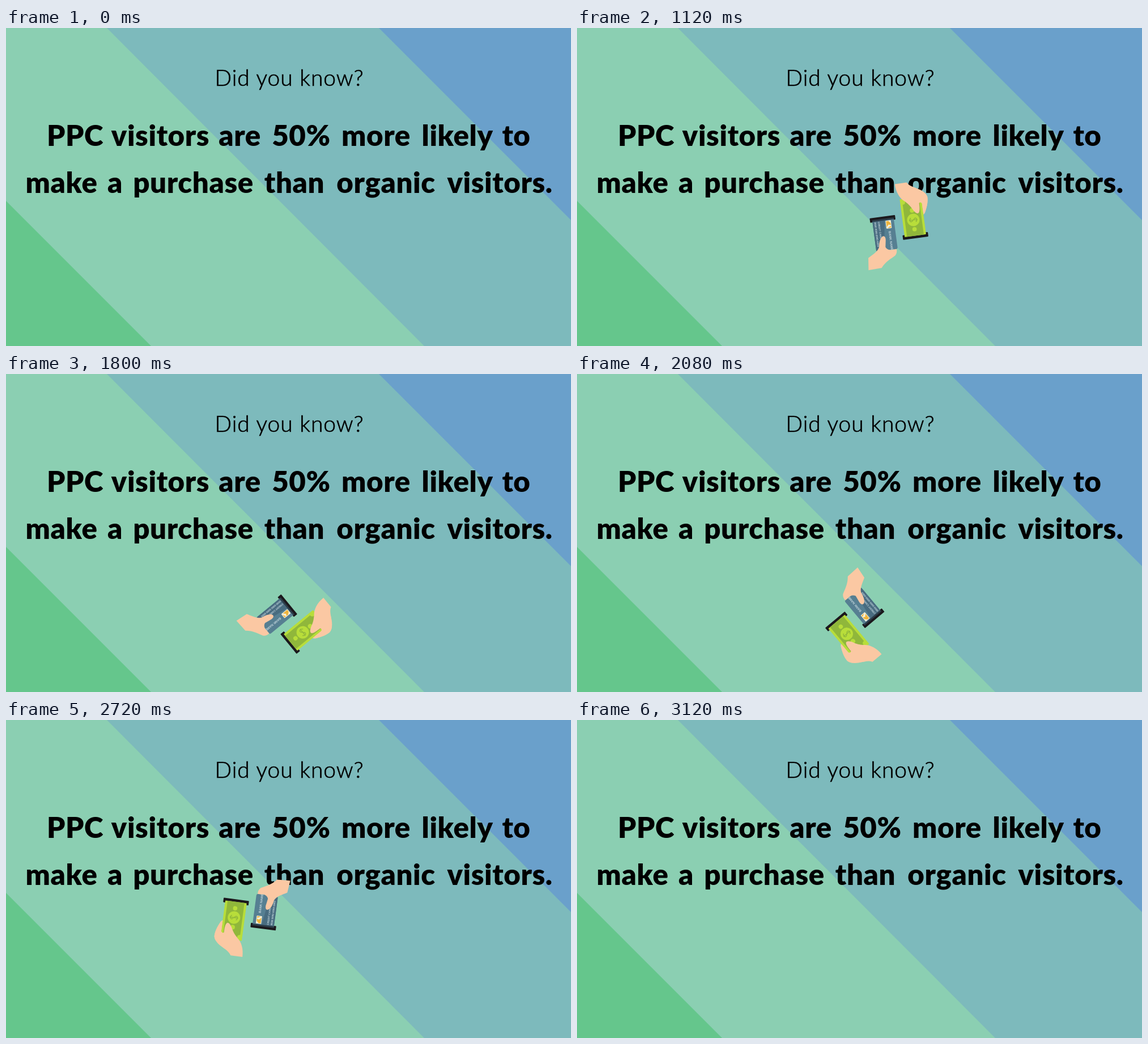
Write an HTML page that moves like this. It is 997 px wide and 561 px high and loops after 3880 ms.

```html
<!DOCTYPE html>
<html lang="en">
<head>
<meta charset="utf-8">
<title>Did you know?</title>
<style>
  html, body { margin: 0; width: 100%; height: 100%; overflow: hidden; }
  svg { display: block; width: 100%; height: 100%; }
  .intro, .fact { text-anchor: middle; }
  .intro { font: 300 39px Lato, "Open Sans", sans-serif; letter-spacing: 1px; stroke: #000; stroke-width: .7px; }
  .fact { font: 900 51px Lato, "Noto Sans", sans-serif; letter-spacing: .6px; }
  .print { font: 700 4.5px "Liberation Sans", sans-serif; fill: #c3d6dc; }
  .print .bank { font-size: 5.6px; }
  .skin { fill: #fbc8a3; }
  .slot { fill: #1b181c; }
</style>
</head>
<body>
<svg viewBox="0 0 997 561">
  <rect width="997" height="561" fill="#8bcfb2"/>
  <path d="M178 0H997V561H738Z" fill="#7dbabc"/>
  <path d="M658 0H997V339Z" fill="#6aa0cb"/>
  <path d="M0 305L256 561H0Z" fill="#65c68c"/>

  <text class="intro" x="500" y="102">Did you know?</text>
  <text class="fact" y="208"><tspan x="122">PPC</tspan><tspan x="272.5">visitors</tspan><tspan x="412.5">are</tspan><tspan x="521">50%</tspan><tspan x="653">more</tspan><tspan x="796.5">likely</tspan><tspan x="900.5">to</tspan></text>
  <text class="fact" y="290.500"><tspan x="98">make</tspan><tspan x="192.5">a</tspan><tspan x="330.5">purchase</tspan><tspan x="509">than</tspan><tspan x="670.5">organic</tspan><tspan x="871.5">visitors.</tspan></text>

  <g id="icon" visibility="hidden">
    <!-- card -->
    <rect class="slot" x="456" y="415" width="45" height="8" rx="1"/>
    <path d="M460 420H498V472Q498 475 495 475H463Q460 475 460 472Z" fill="#567f92"/>
    <path d="M460 420H482L474 475H463Q460 475 460 472Z" fill="#496c80"/>
    <rect x="460" y="419" width="38" height="3" fill="#2c3c48"/>
    <rect x="483" y="423" width="9.5" height="14" rx="1" fill="#f4efd9"/>
    <path d="M484 424H488L491.5 428V432L488 430L484 434ZM485 436L491.5 433V436Z" fill="#eeb43c"/>
    <g class="print">
      <text class="bank" transform="translate(486 442) rotate(90)">BANK NAME</text>
      <text transform="translate(469.5 423) rotate(90)">CREDIT CARD</text>
      <text transform="translate(463 423) rotate(90)">0000 0000 0000 0000</text>
    </g>
    <path class="skin" d="M475 449.500C479 449 480 454 478.500 460L477 469C479 474 484 476 489 475L496 475Q496.500 482 492 486C483 491 474 494 465.500 504.500L442 505.500L444.500 484C453 479 463 475 466 467C467 459 470 451 475 449.500Z"/>

    <!-- cash -->
    <path class="skin" d="M540 371C551 376 560 382 562 391C562 402 557 412 554 418Q551 423 547 420V388Z"/>
    <rect class="slot" x="509.5" y="452.5" width="45" height="8" rx="1"/>
    <rect x="513" y="389" width="38" height="67" rx="1" fill="#b8dd3a"/>
    <path d="M522 394H542Q542 399 547 399V456H517V399Q522 399 522 394Z" fill="#90b73b"/>
    <g fill="#b8dd3a">
      <circle cx="532" cy="428" r="11"/>
      <circle cx="532" cy="411" r="4"/>
      <circle cx="532" cy="444.5" r="3.8"/>
    </g>
    <path d="M528 424C524 427 526 433 530 430L534 426C538 423 540 429 536 432M524.5 428H539.5" fill="none" stroke="#90b73b" stroke-width="1.4"/>
    <path class="skin" d="M508 361H529C533 368 540 370 547 375C555 380 561 384 562 391C562 401 558 410 554 418L551 420V401Q548 397 546 400C546 406 546 414 543 417C539 419 535 413 532 407C529 401 526 398 521 393C513 387 508 375 508 361Z"/>
  </g>
</svg>
<script>
  const LOOP = 3880, STEP = 40, ENTER = 720, LEAVE = 3120;
  const MID = 1920, HALF_SPIN = 480;
  const CX = 498.5, CY = 433;
  const icon = document.getElementById("icon");

  const easeInOut = p => p < .5 ? 2 * p * p : 1 - 2 * (1 - p) ** 2;

  // Swoop in on an arc, half turn on the spot, mirrored swoop out.
  function pose(t) {
    const away = Math.abs(t - MID) - HALF_SPIN;
    if (away <= 0) {
      const p = (t - MID + HALF_SPIN) / (2 * HALF_SPIN);
      return [CX, CY, 180 * easeInOut(p)];
    }
    const k = away / 320;
    const dx = 62.4 * k ** 1.15;
    const y = CY - 85 * k ** 2.135;
    const tilt = 7.6 * k ** 2.22;
    return t < MID ? [CX + dx, y, -tilt] : [CX - dx, y, 180 + tilt];
  }

  const start = performance.now();

  function draw() {
    const now = (performance.now() - start) % LOOP;
    const t = Math.floor(now / STEP) * STEP;
    const shown = t >= ENTER && t < LEAVE;
    icon.setAttribute("visibility", shown ? "visible" : "hidden");
    if (shown) {
      const [x, y, angle] = pose(t);
      icon.setAttribute("transform",
        `translate(${x} ${y}) rotate(${angle}) translate(${-CX} ${-CY})`);
    }
    requestAnimationFrame(draw);
  }
  draw();
</script>
</body>
</html>
```
